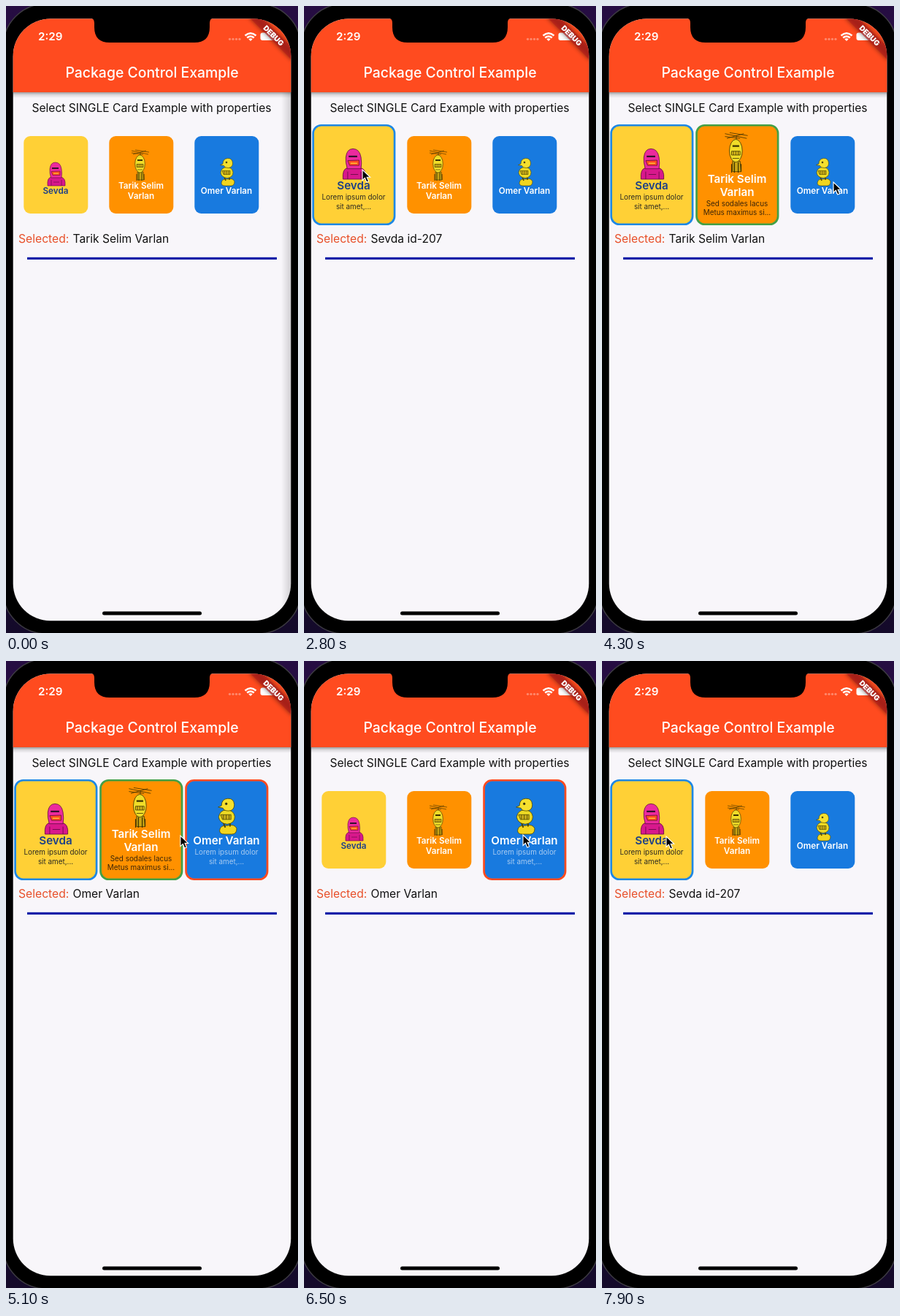
Write an HTML page that moves like this. It is 400x858 px and loops after 8000 ms.

```html
<!DOCTYPE html>
<html lang="en">
<head>
<meta charset="utf-8">
<title>Card selection</title>
<style>
  html, body { margin: 0; width: 100%; height: 100%; overflow: hidden; background: #1c0a35; }
  svg { display: block; width: 100%; height: 100%; font-family: Inter, Roboto, sans-serif; }
  .mid { text-anchor: middle; }
</style>
</head>
<body>
<svg viewBox="0 0 400 858">
  <defs>
    <clipPath id="screen"><rect x="9.700" y="17.500" width="380.600" height="823.700" rx="51"/></clipPath>
    <linearGradient id="desk" x2="0" y2="1">
      <stop stop-color="#260d42"/>
      <stop offset="1" stop-color="#140a2a"/>
    </linearGradient>
    <linearGradient id="under" x2="0" y2="1">
      <stop stop-color="#000" stop-opacity=".36"/>
      <stop offset=".45" stop-color="#000" stop-opacity=".12"/>
      <stop offset="1" stop-color="#000" stop-opacity="0"/>
    </linearGradient>
    <linearGradient id="side">
      <stop stop-color="#000" stop-opacity="0"/>
      <stop offset="1" stop-color="#000" stop-opacity=".16"/>
    </linearGradient>
    <filter id="soft" x="-20%" y="-80%" width="140%" height="260%"><feGaussianBlur stdDeviation="3"/></filter>

    <g id="bot0" stroke="#5a0a3c" stroke-width=".6">
      <path d="M-12 0q-1-11 5-12H6q7 1 6 12z" fill="#d8188c"/>
      <path d="M-7-8V0M7-8V0M-4-5H4" fill="none"/>
      <path d="M-7.500-11q-2-7-1.500-12q1-9 7.500-9q7 0 8.500 9q1 6 0 12z" fill="#ec2a9e"/>
      <path d="M-6-24H3" stroke="#35102c" stroke-width="1.800"/>
      <path d="M-7-19.500L5-20v5.500H-5z" fill="#ff4a24"/>
      <path d="M-4-16.800H3" stroke="#ffc030" stroke-width="1.200"/>
    </g>
    <g id="bot1" stroke="#3a3000" stroke-width=".6">
      <path d="M-12-41L11-36M-10-36L8-41M-7-42L12-39M-12-38L4-36M0-39v5" fill="none"/>
      <path d="M-4-12H4L5-1H-4z" fill="#c8a414"/>
      <path d="M-2-11V0M2-11V0M-5-9V0M5-9V-1" fill="none" stroke-width=".9"/>
      <ellipse cx="-.5" cy="-23" rx="6.800" ry="12" fill="#f0dc28"/>
      <path d="M-4-28H3" stroke-width="1.800"/>
      <path d="M-5-22.500H4v4H-5zM-3-22.500v4M-.5-22.500v4M2-22.500v4" fill="#e0c01c"/>
      <path d="M-4-15H3" fill="none"/>
    </g>
    <g id="bot2" stroke="#4a4200" stroke-width=".6">
      <path d="M-8-4q1-6 8-5q8-2 10 3q0 6-5 6H-3q-5 0-5-4z" fill="#f2d51e"/>
      <path d="M-4-12L-2-7M3-12V-8" stroke-width="1.500"/>
      <path d="M-9-18q1-7 8-7.500q8 0 9 7q0 7-8 8q-8-1-9-7.500z" fill="#edda24"/>
      <path d="M-7-20.500H4v5H-5zM-4-20.500v5M-1-20.500v5M2-20.500v5" fill="#c9ae1b"/>
      <path d="M-6-30q0-7 6.500-7.500t7 6.500q0 6-6 6.500q-5 0-6-3l-5-1z" fill="#f5e02e"/>
      <circle cx="-1" cy="-32" r="1" fill="#222"/>
    </g>
  </defs>

  <rect width="400" height="858" fill="url(#desk)"/>
  <rect x="-4" y="-3" width="408" height="862" rx="59" stroke="#3d3b42" stroke-width="1.500"/>
  <g clip-path="url(#screen)">
    <rect x="9" y="17" width="382" height="825" fill="#f8f6fa"/>
    <rect id="edge" x="377" y="118" width="13.500" height="724" fill="url(#side)"/>
    <rect x="9" y="118" width="382" height="8" fill="url(#under)"/>
    <rect x="9" y="17" width="382" height="101" fill="#ff4b1f"/>
    <text class="mid" x="200" y="97.700" font-size="19.400" font-weight="500" fill="#fff">Package Control Example</text>
    <g fill="#fff">
      <text x="44" y="47.300" font-size="15.200" font-weight="600">2:29</text>
      <g opacity=".35">
        <circle cx="306.500" cy="45.300" r="1.600"/><circle cx="311" cy="45.300" r="1.600"/>
        <circle cx="315.500" cy="45.300" r="1.600"/><circle cx="320" cy="45.300" r="1.600"/>
      </g>
      <path d="M327.500 40.500q7.500-6.500 15 0M330.200 43.500q4.800-4 9.600 0" fill="none" stroke="#fff" stroke-width="2.400"/>
      <path d="M332.300 45.200q2.700-2 5.400 0L335 47.900z"/>
      <rect x="348.500" y="36.500" width="22" height="10.500" rx="3"/>
    </g>
    <g transform="translate(366.600 40.400) rotate(45)">
      <rect x="-42" y="-6" width="84" height="12" opacity=".5" filter="url(#soft)"/>
      <rect x="-39" y="-6" width="78" height="12" fill="#b71c1c" fill-opacity=".65"/>
      <text class="mid" y="3.600" font-size="10" font-weight="900" fill="#fff">DEBUG</text>
    </g>
    <text class="mid" x="199.500" y="144.700" font-size="15.600" fill="#111">Select SINGLE Card Example with properties</text>
    <text x="17" y="324.300" font-size="15.700" fill="#e8502a">Selected:</text>
    <text id="picked" x="91.500" y="324.300" font-size="15.600" fill="#111"></text>
    <rect x="29" y="343.800" width="342" height="3.200" fill="#1020a8"/>
    <g id="cards"></g>
  </g>
  <path d="M115 16q6 1 6 7v6q0 21 21 21H258q21 0 21-21V23q0-6 6-7z"/>
  <rect x="132" y="828.500" width="136" height="5" rx="2.500"/>
  <path id="cursor" d="M0 0V14.500L3.400 11.300L5.800 17L8.500 15.900L6.100 10.300H10.700Z" stroke="#fff" stroke-width="1.100"/>
</svg>
<script>
const LOOP = 8000, GROW = 250;
const $ = id => document.getElementById(id);

const cards = [
  { x: 68, bot: 69, lines: ['Sevda'], label: 'Sevda id-207', note: ['Lorem ipsum dolor', 'sit amet,...'],
    fill: '#ffd036', edge: '#1e88e5', ink: '#1c3f87', noteInk: '#2b2a22' },
  { x: 185, bot: 184, lines: ['Tarik Selim', 'Varlan'], label: 'Tarik Selim Varlan', note: ['Sed sodales lacus', 'Metus maximus si...'],
    fill: '#ff9100', edge: '#43a047', ink: '#fff', noteInk: '#3a2508' },
  { x: 302, bot: 303, lines: ['Omer Varlan'], label: 'Omer Varlan', note: ['Lorem ipsum dolor', 'sit amet,...'],
    fill: '#187adf', edge: '#ff4b1f', ink: '#fff', noteInk: '#a9cbf0' }
];

// [time, card]: every click toggles its card
const clicks = [[2100, 0], [3500, 1], [4600, 2], [5400, 1], [6100, 0], [6500, 2], [7300, 0]];

// [time, x, y] of the pointer tip
const path = [
  [700, 400, 470], [1300, 78, 204], [1600, 78, 204], [2100, 80, 224], [2800, 80, 224],
  [3300, 195, 222], [3700, 198, 226], [4250, 317, 241], [4800, 317, 241], [5300, 197, 238],
  [5600, 197, 238], [5950, 78, 239], [6200, 78, 239], [6400, 300, 238], [6600, 300, 238],
  [6900, 119, 238], [7100, 84, 240], [7500, 84, 240], [7800, 203, 144], [7900, 88, 240]
];

const mix = (a, b, k) => a + (b - a) * k;
const ease = k => k * k * (3 - 2 * k);

function growth(i, t) {
  let open = 0, k = 0;
  for (const [at, card] of clicks) {
    if (card !== i || t < at) continue;
    open = 1 - open;
    const p = ease(Math.min(1, (t - at) / GROW));
    k = open ? p : 1 - p;
  }
  return k;
}

function textLines(lines, x, y, step, attrs) {
  return lines.map((s, n) => `<text class="mid" x="${x}" y="${y + n * step}" ${attrs}>${s}</text>`).join('');
}

function drawCard(c, i, t) {
  const k = growth(i, t), two = c.lines.length > 1;
  const w = mix(88, 111.5, k), h = mix(106, 135.5, k);
  const foot = mix(two ? 239 : 246, two ? 228 : 237, k);
  const nameY = mix(two ? 250.2 : 257, two ? 242.4 : 250.8, k);
  return `<rect x="${c.x + .3 - w / 2}" y="${231 - h / 2}" width="${w}" height="${h}" rx="${mix(9, 11, k)}"
      fill="${c.fill}" stroke="${c.edge}" stroke-width="${2.7 * k}"/>
    <use href="#bot${i}" transform="translate(${c.bot} ${foot}) scale(${mix(1, 1.3, k)})"/>` +
    textLines(c.lines, c.x, nameY, mix(13.6, 17.5, k), `font-size="${mix(11.7, 15.2, k)}" font-weight="600" fill="${c.ink}"`) +
    textLines(c.note, c.x, two ? 273.7 : 265.1, 12.6, `font-size="9.9" fill="${c.noteInk}" opacity="${k}"`);
}

function pointer(t) {
  const n = path.findIndex(p => p[0] > t);
  if (n < 0) return path[path.length - 1].slice(1);
  if (n === 0) return null;
  const [t0, x0, y0] = path[n - 1], [t1, x1, y1] = path[n];
  const k = ease((t - t0) / (t1 - t0));
  return [mix(x0, x1, k), mix(y0, y1, k)];
}

function draw(now) {
  const t = now % LOOP;
  $('cards').innerHTML = cards.map((c, i) => drawCard(c, i, t)).join('');
  const last = clicks.filter(([at]) => at <= t).pop();
  $('picked').textContent = cards[last ? last[1] : 1].label;
  // page-slide shadow fades as the page settles
  $('edge').setAttribute('opacity', Math.max(0, Math.min(1, (300 - t) / 200)));
  const pos = pointer(t);
  $('cursor').setAttribute('visibility', pos ? 'visible' : 'hidden');
  if (pos) $('cursor').setAttribute('transform', `translate(${pos})`);
}

const start = performance.now();
function tick() {
  draw(performance.now() - start);
  requestAnimationFrame(tick);
}
tick();
</script>
</body>
</html>
```
